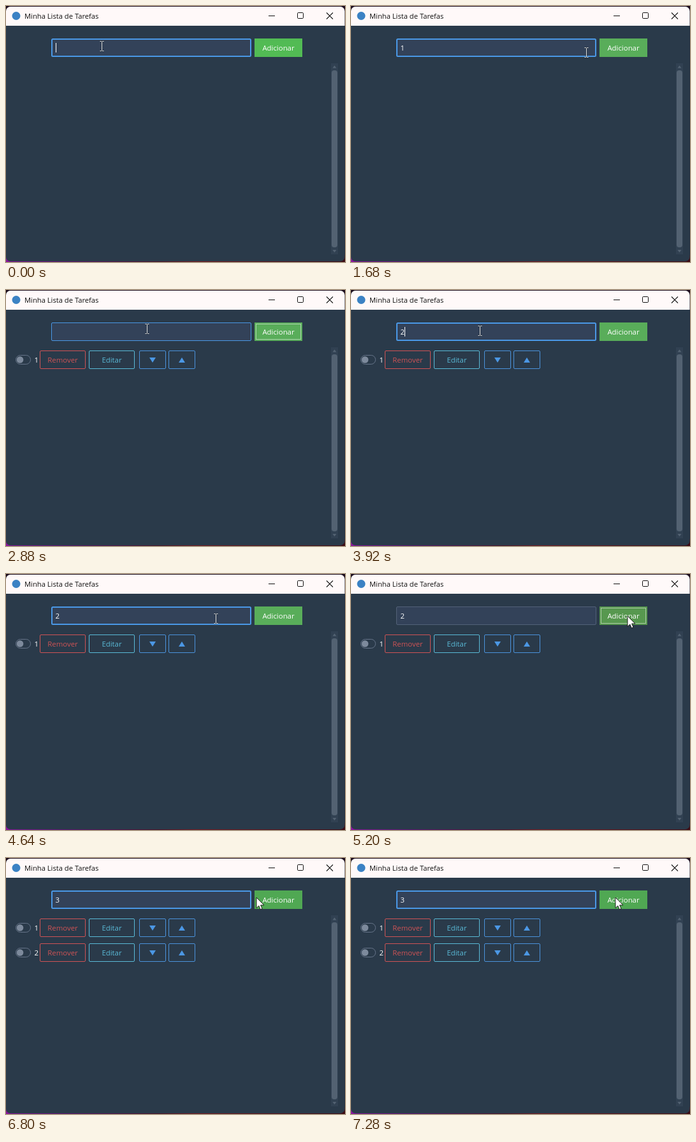
These frames come from a looping animation (532x402 px, 8 s). An HTML page:

```html
<!DOCTYPE html>
<html lang="pt">
<head>
<meta charset="utf-8">
<title>Minha Lista de Tarefas</title>
<style>
  html, body { margin: 0; width: 100%; height: 100%; overflow: hidden; background: #1c0c1c; }
  svg { display: block; width: 532px; height: 402px; }
  text { font: 11.4px "Open Sans", "Noto Sans", sans-serif; fill: #fff; }
  .title { font-size: 11.2px; fill: #111; }
  .mid { text-anchor: middle; }
</style>
</head>
<body>
<svg viewBox="0 0 532 402">
  <defs>
    <linearGradient id="desk">
      <stop offset="0" stop-color="#8a169c"/>
      <stop offset=".18" stop-color="#5c1470"/>
      <stop offset=".45" stop-color="#4a1226"/>
      <stop offset=".56" stop-color="#7c1a1e"/>
      <stop offset="1" stop-color="#3c0c14"/>
    </linearGradient>
    <clipPath id="win"><rect y="1" width="531.5" height="400" rx="7"/></clipPath>
    <g id="row">
      <rect x="15.5" y="102.5" width="23" height="14" rx="7" fill="none" stroke="#67758a"/>
      <circle cx="22" cy="109.5" r="5.3" fill="#7d8a9c"/>
      <g fill="none">
        <rect x="53.5" y="95.5" width="71" height="28" rx="1.5" stroke="#cf5355"/>
        <rect x="130.5" y="95.5" width="71" height="28" rx="1.5" stroke="#5abbd8"/>
        <rect x="209.5" y="95.5" width="41" height="28" rx="1.5" stroke="#4b93dc"/>
        <rect x="255.5" y="95.5" width="41" height="28" rx="1.5" stroke="#4b93dc"/>
      </g>
      <text class="mid" x="89" y="114" style="fill:#cf5355">Remover</text>
      <text class="mid" x="166" y="114" style="fill:#5abbd8">Editar</text>
      <path d="M225 106h10l-5 8zM271 114h10l-5-8z" fill="#4b97e4"/>
    </g>
  </defs>

  <rect width="532" height="402" fill="#1c0c1c"/>
  <rect y="380" width="532" height="22" fill="url(#desk)"/>
  <rect x="531" y="31" width="1" height="360" fill="#141c30"/>
  <g clip-path="url(#win)">
    <rect width="532" height="402" fill="#2a3a4a"/>
    <rect width="532" height="31" fill="#fff9f9"/>
  </g>

  <circle cx="16" cy="15.5" r="6.5" fill="#3b82c4"/>
  <text class="title" x="29" y="20">Minha Lista de Tarefas</text>
  <g fill="none" stroke="#111">
    <path d="M412 15.5h10"/>
    <rect x="457.5" y="10.5" width="9" height="9" rx="1.2"/>
    <path d="M503 10.5l10 10m0-10l-10 10" stroke-width="1.1"/>
  </g>

  <rect x="510" y="90" width="11" height="300" fill="#314152"/>
  <rect x="511" y="101" width="9" height="278" rx="4" fill="#536272"/>
  <path d="M512.5 97.5h6l-3-4zM512.5 383h6l-3 4z" fill="#536272"/>

  <rect id="field" rx="1.5" fill="#334259"/>
  <text id="entry" x="77.5" y="70"></text>
  <rect id="caret" y="58" width="1" height="15" fill="#fff"/>

  <rect id="button" x="390" y="51" width="75" height="29"/>
  <rect id="ring" x="392.5" y="53.5" width="70" height="24" fill="none" stroke="#fff" stroke-dasharray="1 1"/>
  <text class="mid" x="427.5" y="70">Adicionar</text>

  <g id="rows"></g>

  <g id="beam" fill="none">
    <path d="M-3-7.5h2.2L0-6.5l.8-1h2.2M0-6.5v13M-3 7.5h2.2L0 6.5l.8 1h2.2" stroke="#1b2430" stroke-width="2" opacity=".6"/>
    <path d="M-3-7.5h2.2L0-6.5l.8-1h2.2M0-6.5v13M-3 7.5h2.2L0 6.5l.8 1h2.2" stroke="#e4e4e4"/>
  </g>
  <path id="arrow" d="M0 0V16.5L3.8 13l2.5 5.8 2.7-1.2-2.4-5.6h5.3z" fill="#fff" stroke="#111" stroke-width=".9"/>
</svg>
<script>
const LOOP = 8000, STEP = 80;
const $ = id => document.getElementById(id);
const set = (id, attrs) => { for (const k in attrs) $(id).setAttribute(k, attrs[k]); };
const show = (id, on) => set(id, { visibility: on ? 'visible' : 'hidden' });
const within = (t, spans) => spans.some(([a, b]) => t >= a && t < b);

// Mouse path: time, x, y
const path = [
  [0, 151, 63], [400, 172, 60], [1440, 172, 60], [1680, 370, 73], [1760, 398, 70],
  [2080, 428, 66], [2640, 428, 66], [2880, 222, 61], [3440, 203, 64], [4240, 203, 64],
  [4640, 330, 70], [4720, 330, 70], [5040, 430, 66], [5200, 434, 66], [5360, 250, 64],
  [5440, 250, 64], [5600, 215, 63], [6320, 215, 63], [6800, 393, 62], [7200, 414, 62],
  [7280, 415, 62], [LOOP, 415, 62]
];
const presses = [[2080, 2240], [5120, 5280]];
const buttonFocus = [[2080, 3440], [5120, 5600]];
const caretOn = [[0, 1600], [3440, 4320], [5600, 6640]];
const typed = [['1', 1200, 2240], ['2', 3680, 5280], ['3', 6240, LOOP]];
const added = [2240, 5280];

$('rows').innerHTML = added.map((_, i) =>
  `<g id="task${i}" transform="translate(0 ${i * 39})"><use href="#row"/><text x="44.5" y="114">${i + 1}</text></g>`
).join('');

function mouseAt(t) {
  const i = Math.max(1, path.findIndex(p => p[0] >= t));
  const [t0, x0, y0] = path[i - 1], [t1, x1, y1] = path[i];
  const k = (t - t0) / (t1 - t0);
  return [Math.round(x0 + (x1 - x0) * k), Math.round(y0 + (y1 - y0) * k)];
}

function draw(time) {
  const t = Math.floor(time % LOOP / STEP) * STEP;
  const [x, y] = mouseAt(t);
  const overField = x > 71 && x < 385;
  const overButton = x >= 390 && x < 465;
  const ringOn = within(t, buttonFocus);
  const word = typed.find(([, a, b]) => t >= a && t < b);

  const w = ringOn ? 1 : 2;
  set('field', {
    x: 71 + w / 2, y: 51 + w / 2, width: 314 - w, height: 29 - w,
    'stroke-width': w, stroke: ringOn && !overField ? '#526178' : '#4a98e6'
  });
  $('entry').textContent = word ? word[0] : '';
  set('caret', { x: word ? 84 : 78 });
  show('caret', within(t, caretOn));

  set('button', {
    fill: within(t, presses) ? '#57984f' : overButton ? '#50a853' : t < 400 ? '#52bb54' : '#59ad5a'
  });
  show('ring', ringOn);
  added.forEach((at, i) => show('task' + i, t >= at));

  const place = { transform: `translate(${x} ${y})` };
  set('beam', { transform: `translate(${x - .5} ${y})` });
  set('arrow', place);
  show('beam', overField);
  show('arrow', !overField);
}

let start;
function tick(now) {
  start ??= now;
  draw(now - start);
  requestAnimationFrame(tick);
}
draw(0);
requestAnimationFrame(tick);
</script>
</body>
</html>
```
